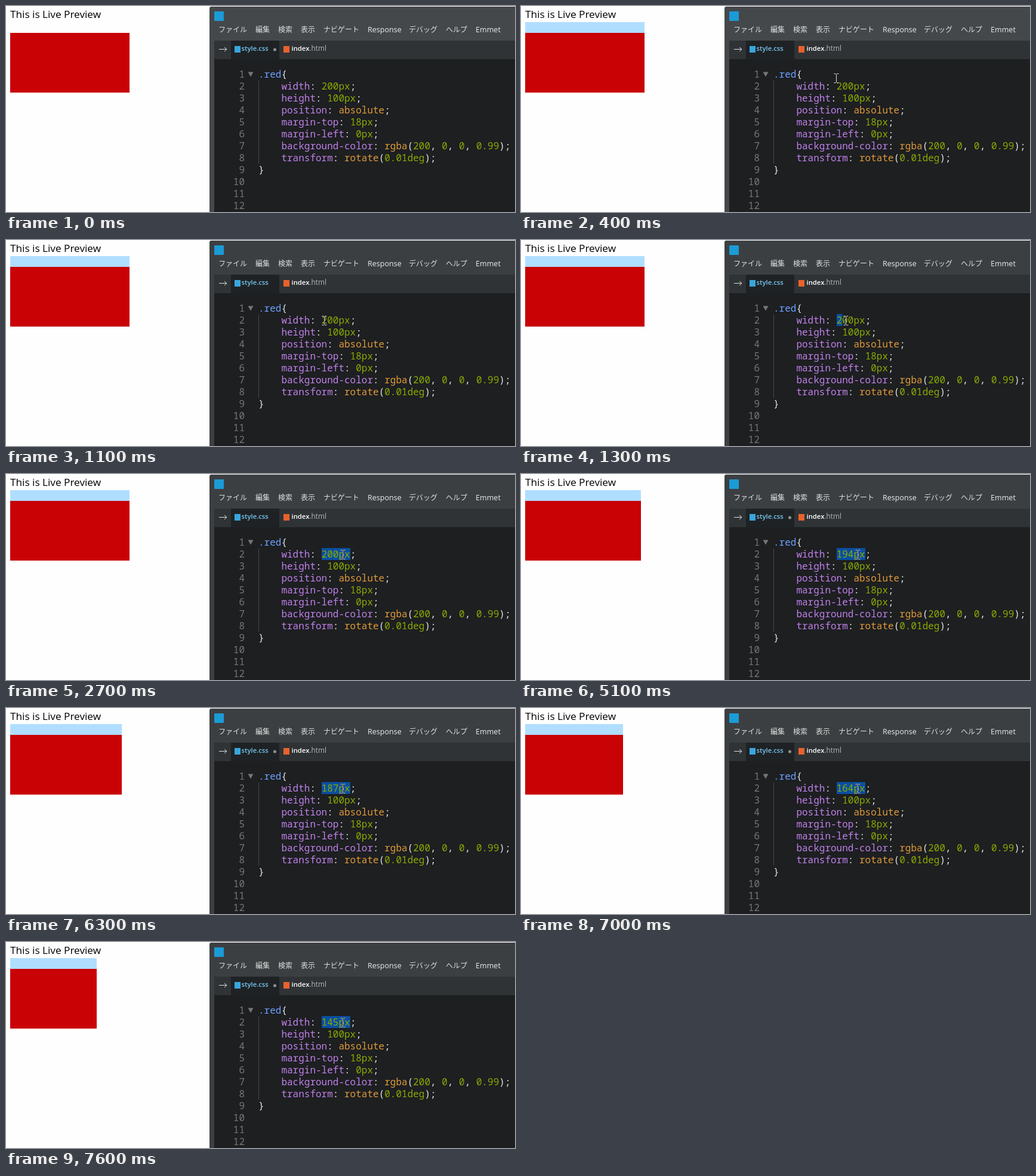
Write an HTML page that moves like this. It is 853 px wide and 345 px high and loops after 8000 ms.

```html
<!DOCTYPE html>
<html lang="ja">
<head>
<meta charset="utf-8">
<style>
html, body { margin: 0; width: 100%; height: 100%; overflow: hidden; background: #fefefe; }
svg { display: block; }
text { white-space: pre; }
.page { font: 17.2px "Open Sans", sans-serif; }
.menu { font: 12.5px "Noto Sans", "Noto Sans CJK JP", "Noto Sans CJK", sans-serif; fill: #dfe0e1; }
.menu .cjk { font: 12px "Noto Sans CJK JP", "Noto Sans CJK", sans-serif; }
.tab { font: 600 11.3px "Open Sans", sans-serif; }
.code { font: 500 16px "Noto Sans Mono", monospace; fill: #e4e4e4; }
.num { fill: #767676; text-anchor: end; font-weight: 400; }
.sel { fill: #6ca0ff; } .prop { fill: #c080ea; } .val { fill: #8aaa00; } .key { fill: #e09a38; }
#cursor { mix-blend-mode: difference; fill: none; stroke: #fff; }
</style>
</head>
<body>
<svg width="853" height="345" viewBox="0 0 853 345">
  <text class="page" x="7" y="20">This is Live Preview</text>
  <rect id="margin" x="7" y="27" height="18" fill="#b0deff"/>
  <rect id="red" x="7" y="45" height="100" fill="#c80205"/>

  <path id="frame" d="M341 345V4q0-3 3-3H853V345z"/>
  <rect x="349" y="9" width="16" height="16" rx="1" fill="#1b9bd7"/>
  <g id="menu" class="menu"></g>

  <rect x="349" y="58" width="504" height="32" fill="#2f3336"/>
  <rect x="349" y="89" width="504" height="256" fill="#1d1f21"/>
  <rect x="377" y="58" width="81" height="32" fill="#1e2224"/>
  <path d="M357 72.5h13m-4-3.5l4 3.5l-4 3.5" fill="none" stroke="#ddd"/>
  <rect x="383" y="67" width="10" height="11" fill="#3aa5dc"/>
  <text class="tab" x="394.5" y="75" fill="#78c6f2">style.css</text>
  <circle id="unsaved" cx="450.5" cy="73" r="2.6" fill="#8b8d8f"/>
  <rect x="465" y="67" width="10" height="11" fill="#e8622c"/>
  <text class="tab" x="478.5" y="75" fill="#fff">index<tspan fill="#b5b7b9" font-weight="400" font-size="11.8">.html</tspan></text>

  <rect id="selection" x="529" y="124" height="20" fill="#0a50a0"/>
  <path d="M405.5 110.5h9l-4.5 8z" fill="#767676"/>
  <path d="M423.5 125V264" stroke="#46494b"/>
  <g id="code" class="code"></g>
  <path id="cursor" d="M-4-7.5h3l1 1l1-1h3M0-6.5V6.5M-4 7.5h3l1-1l1 1h3"/>
</svg>
<script>
const LOOP = 8000, CHAR = 9.6;
const $ = id => document.getElementById(id);
const span = (cls, s, id = '') => `<tspan class="${cls}" id="${id}">${s}</tspan>`;

const menu = [[356, 'ファイル'], [418, '編集'], [456, '検索'], [494, '表示'], [532, 'ナビゲート'],
  [606, 'Response'], [675, 'デバッグ'], [737, 'ヘルプ'], [787, 'Emmet']];
$('menu').innerHTML = menu.map(([x, s]) =>
  `<text x="${x}" y="44" class="${s < 'a' ? '' : 'cjk'}">${s}</text>`).join('');

const rule = (name, value) => `    ${span('prop', name)}: ${value};`;
const val = s => span('val', s), key = s => span('key', s);
const lines = [
  span('sel', '.red') + '{',
  rule('width', span('val', '200px', 'width')),
  rule('height', val('100px')),
  rule('position', key('absolute')),
  rule('margin-top', val('18px')),
  rule('margin-left', val('0px')),
  rule('background-color', `${key('rgba')}(${['200', '0', '0', '0.99'].map(val).join(', ')})`),
  rule('transform', `${key('rotate')}(${val('0.01deg')})`),
  '}', '', '', ''
];
$('code').innerHTML = lines.map((s, i) => {
  const y = 120 + 20 * i;
  return `<text class="num" x="400" y="${y}">${i + 1}</text><text x="423" y="${y}">${s}</text>`;
}).join('');

// [time, x, y] of the pointer
const path = [[100, 847, 112], [400, 528, 121], [900, 528, 135], [1000, 528, 135],
  [1300, 544, 135], [1900, 577, 135], [2100, 578, 135], [2500, 578, 135], [2700, 564, 135]];
// times at which the width drops by one pixel
const drops = [4300, 4500, 4700, 4900, 5000, 5100, 5300, 5400, 5800];

function pointer(t) {
  const i = path.findIndex(p => p[0] > t);
  if (i < 0) return path.at(-1).slice(1);
  const [a, b] = [path[Math.max(i - 1, 0)], path[i]];
  const k = Math.max(0, (t - a[0]) / (b[0] - a[0]));
  return [1, 2].map(n => Math.round(a[n] + (b[n] - a[n]) * k));
}

function boxWidth(t) {
  if (t < 6300) return 200 - drops.filter(d => d <= t).length;
  // scrubs to 161, rests, then goes on to 145
  const steps = Math.min(t, 7100) - 6300 + Math.max(0, Math.min(t, 7600) - 7100);
  return Math.round(187 - steps * 42 / 1300);
}

function draw(now) {
  const t = Math.floor(now % LOOP / 100) * 100;
  const w = boxWidth(t), [x, y] = pointer(t);
  const chars = t < 1100 ? 0 : t < 1900 ? Math.max(0, Math.floor((x - 529) / CHAR)) : 5;
  const show = (id, on) => $(id).setAttribute('visibility', on ? 'visible' : 'hidden');

  $('red').setAttribute('width', w);
  $('margin').setAttribute('width', w);
  $('width').textContent = w + 'px';
  $('selection').setAttribute('width', chars * CHAR);
  $('cursor').setAttribute('transform', `translate(${x + .5} ${y})`);
  $('frame').setAttribute('fill', t < 1100 ? '#45484b' : '#3c3f41');
  show('margin', t >= 100);
  show('cursor', t >= 100);
  show('unsaved', t < 100 || t >= 4400);
  requestAnimationFrame(draw);
}
draw(0);
</script>
</body>
</html>
```
